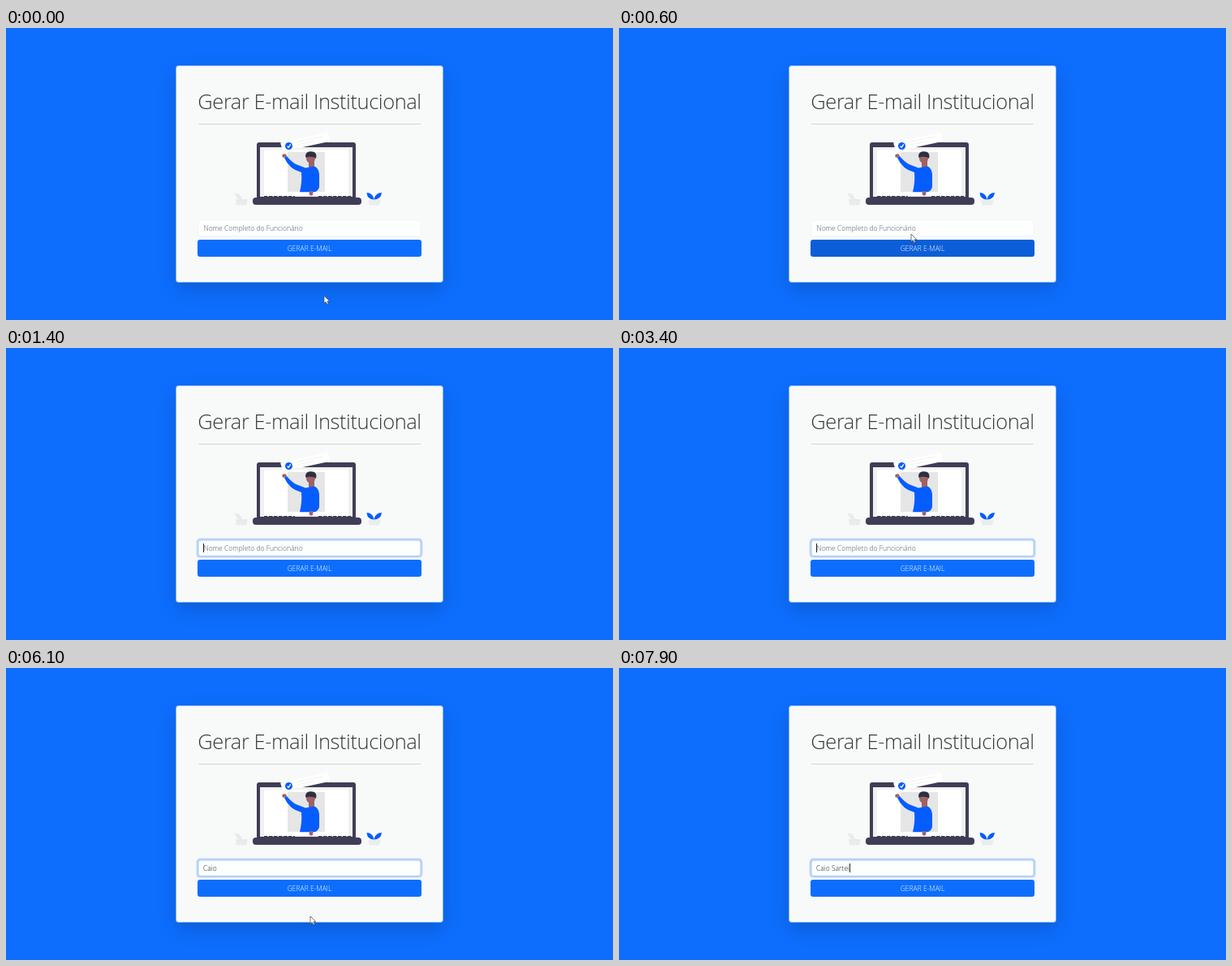
Recreate the animation shown at these times as an HTML page. Size 748 by 360 pixels, loop 8000 ms.

```html
<!DOCTYPE html>
<html lang="pt">
<head>
<meta charset="utf-8">
<title>Gerar E-mail Institucional</title>
<style>
  html, body { margin: 0; width: 100%; height: 100%; overflow: hidden; background: #0d6efd; }
  .card {
    position: absolute; left: 210px; top: 47px; width: 328px; height: 266px;
    border-radius: 3px; background: #f8faf9;
    box-shadow: 0 0 0 1px rgba(248, 250, 249, .5), 0 8px 25px rgba(0, 0, 0, .175);
  }
  svg { position: absolute; left: 0; top: 0; display: block; }
  text { font: 300 8.5px "Open Sans", "Noto Sans", sans-serif; white-space: pre; }
  .title { font-size: 25.5px; letter-spacing: -.44px; fill: #34383c; }
  .hint { fill: #545b62; }
  .typed { fill: #212529; }
  .label { fill: #fff; }
  .dark { fill: #3f3d56; }
  .grey { fill: #e6e6e6; }
  .blue { fill: #055cff; }
  .skin { fill: #9f616a; }
  .hair { fill: #2f2e41; }
  .field { fill: #fdfefe; stroke: #eef1f3; stroke-width: .6; }
  .focused .field { stroke: #a3c7fa; stroke-width: 1; }
  .ring { fill: #bdd6fa; visibility: hidden; }
  .focused .ring { visibility: visible; }
  .button { fill: #0d6efd; }
  .button.hover { fill: #0b5ed7; }
</style>
</head>
<body>
<div class="card"></div>
<svg width="748" height="360" viewBox="0 0 748 360">
  <text class="title" x="374" y="100" text-anchor="middle">Gerar E-mail Institucional</text>
  <rect x="237" y="118" width="274" height="1" fill="#d3d6d8"/>

  <!-- laptop -->
  <rect class="dark" x="309" y="141" width="122" height="72" rx="3"/>
  <rect x="313" y="147" width="114" height="61" fill="#f0f0f1"/>
  <rect x="318" y="150" width="104" height="57" fill="#fff"/>
  <rect class="grey" x="347" y="153" width="46" height="49"/>
  <rect class="dark" x="304" y="209" width="134" height="9" rx="4"/>
  <path d="M318 208H356M385 208H425" stroke="#3f3d56" stroke-width="2" stroke-dasharray="4.500 1.500"/>

  <!-- floating note -->
  <path d="M338 141.500L395 129Q396.500 128.700 396.900 130L399 139.700L341.500 152.300Z" fill="#fff"/>
  <path d="M358 140.500L391 133.500M359 144L380 139.500" stroke="#ececec" stroke-width=".8"/>
  <circle class="blue" cx="348.5" cy="145.500" r="4.500"/>
  <path d="M346.500 145.700L348.200 147.300L350.700 143.300" fill="none" stroke="#fff" stroke-width="1.300"/>

  <!-- person -->
  <path class="skin" d="M373 164H380V172H373Z"/>
  <circle class="skin" cx="375.5" cy="161" r="5.500"/>
  <path class="hair" d="M369.500 160C368 154.500 371.500 152 376 152.200C381 152.200 383.500 155.500 382 161C380.500 158.500 373 157.800 369.500 160Z"/>
  <ellipse class="skin" cx="343" cy="157.500" rx="2.700" ry="2.200"/>
  <path class="blue" d="M343 160L346 158Q352 165.500 358 168.300L369 172.500L380 170.500Q385 172 386 180V196Q385 201 380 202.300H362Q365 190 364 178Q349 174 343 160Z"/>
  <path class="skin" d="M374 201H378.500L378 206Q375.500 208 373.500 205Z"/>

  <!-- plants -->
  <path class="grey" d="M283 211H298L296 218.500H284ZM290 212Q282 210 282 203Q289 204 291 211Z" opacity=".8"/>
  <path class="grey" d="M446 211.500H462L460 218.500H448Z" opacity=".7"/>
  <path class="blue" d="M453.500 211.500Q445 211.500 444.500 203Q452 203 453.500 211.500Q455 203 463 203Q462 211.500 453.500 211.500Z"/>

  <!-- form -->
  <g id="form">
    <rect class="ring" x="234.600" y="234.600" width="278.800" height="23.900" rx="4.500"/>
    <rect class="field" x="237" y="237" width="274" height="19.500" rx="3"/>
    <text id="hint" class="hint" x="243.500" y="249.700">Nome Completo do Funcionário</text>
    <text id="typed" class="typed" x="243" y="249.700"></text>
    <rect id="caret" y="241" width="1" height="11" fill="#212529"/>
    <rect id="button" class="button" x="236" y="261" width="276" height="21" rx="3"/>
    <text class="label" x="374" y="274.900" text-anchor="middle">GERAR E-MAIL</text>
  </g>

  <path id="mouse" d="M0 0V9.500L2.200 7.500L3.700 10.800L5.300 10L3.900 6.900H6.800Z" fill="#fff" stroke="#3a3f4a" stroke-width=".7"/>
</svg>
<script>
  const LOOP = 8000, STEP = 100, CLICK = 1200, BLINK = 500;
  const [form, hint, typed, caret, button, mouse] =
    ["form", "hint", "typed", "caret", "button", "mouse"].map(id => document.getElementById(id));

  const snap = t => Math.floor(t / STEP) * STEP;
  const show = (el, on) => el.setAttribute("visibility", on ? "visible" : "hidden");

  // each run of letters is struck at a steady pace
  const strike = (text, start, pace) =>
    [...text].map((letter, i) => ({ letter, time: snap(start + i * pace) }));
  const keys = [
    ...strike("Caio", 3700, 270),
    ...strike(" ", 5500, 0),
    ...strike("Sartei", 6940, 175)
  ];

  function glide([x0, y0], [x1, y1], u) {
    const e = 1 - (1 - Math.min(u, 1)) ** 1.5;
    return [x0 + (x1 - x0) * e, y0 + (y1 - y0) * e];
  }

  // the arrow is unseen while it rests over the text field
  function pointer(t) {
    if (t < 700) return glide([392, 330], [360, 254], t / 600);
    if (t >= 5500 && t < 7900) return glide([362, 256], [375, 306], (t - 5500) / 600);
    return null;
  }

  function onButton(t) {
    const p = pointer(Math.max(t, 0));
    return p !== null && p[1] > 261 && p[1] < 282;
  }

  function draw(t) {
    const struck = keys.filter(k => t >= k.time);
    typed.textContent = struck.map(k => k.letter).join("");
    show(hint, !struck.length);
    form.classList.toggle("focused", t >= CLICK + 200);

    // every key restarts the blink
    const woke = struck.length ? struck[struck.length - 1].time : CLICK;
    show(caret, t >= CLICK && Math.floor((t - woke) / BLINK) % 2 === 0);
    const end = struck.length ? typed.getComputedTextLength() : 0;
    caret.setAttribute("x", Math.round(243 + end));

    // the hover colour lingers briefly
    button.classList.toggle("hover", onButton(t) || onButton(t - 200));

    const p = pointer(t);
    show(mouse, p);
    if (p) mouse.setAttribute("transform", `translate(${p})`);
  }

  const start = performance.now();
  function tick() {
    draw(snap((performance.now() - start) % LOOP));
    requestAnimationFrame(tick);
  }
  tick();
</script>
</body>
</html>
```
